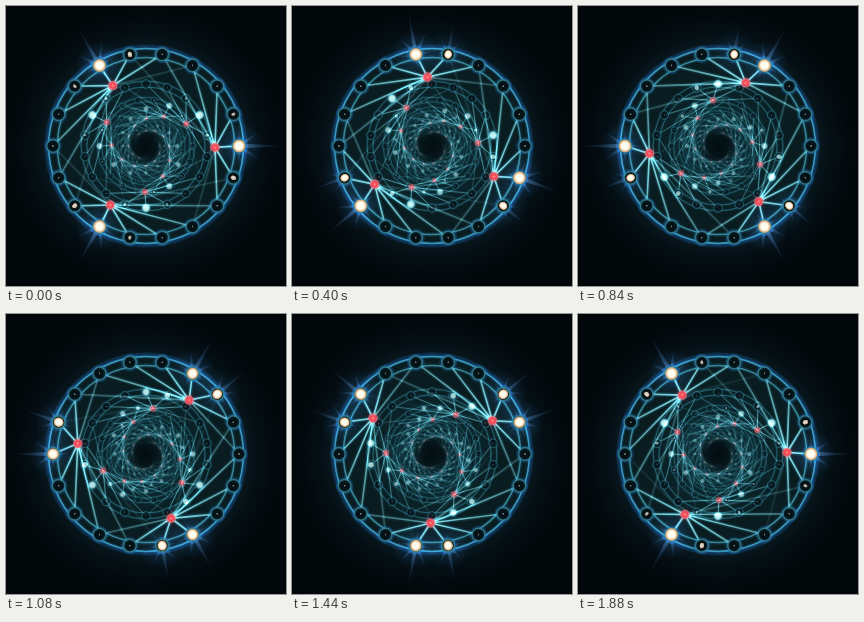
These frames come from a looping animation (280x280 px, 1.92 s). An HTML page with a canvas:

```html
<!DOCTYPE html>
<html lang="en">
<head>
<meta charset="utf-8">
<title>Light tunnel</title>
<style>
html, body { margin: 0; width: 100%; height: 100%; overflow: hidden; background: #02070a; }
canvas { display: block; }
</style>
</head>
<body>
<canvas id="stage" width="280" height="280"></canvas>
<script>
const ctx = document.getElementById('stage').getContext('2d');
const LOOP = 1920, STEP = 40, BEADS = 18, LEVELS = 9, RAD = Math.PI / 180;

const polar = (r, deg) => [r * Math.cos(deg * RAD), r * Math.sin(deg * RAD)];
const wrap = (d, span) => d - span * Math.round(d / span);
const clamp = x => Math.max(0, Math.min(1, x));
const blend = mode => ctx.globalCompositeOperation = mode;

function disc(x, y, r, fill) {
  ctx.beginPath();
  ctx.arc(x, y, r, 0, 2 * Math.PI);
  ctx.fillStyle = fill;
  ctx.fill();
}

function circle(x, y, r, width, color) {
  ctx.beginPath();
  ctx.arc(x, y, r, 0, 2 * Math.PI);
  ctx.lineWidth = width;
  ctx.strokeStyle = color;
  ctx.stroke();
}

function line(a, b, width, color) {
  ctx.beginPath();
  ctx.moveTo(...a);
  ctx.lineTo(...b);
  ctx.lineWidth = width;
  ctx.strokeStyle = color;
  ctx.stroke();
}

function radial(x, y, r, ...stops) {
  const g = ctx.createRadialGradient(x, y, 0, x, y, r);
  stops.forEach(([at, color]) => g.addColorStop(at, color));
  return g;
}

const glow = (x, y, r, rgb, a) =>
  disc(x, y, r, radial(x, y, r, [0, `rgba(${rgb},${a})`], [.4, `rgba(${rgb},${a * .35})`], [1, `rgba(${rgb},0)`]));

function softCircle(x, y, r, core, a) {
  circle(x, y, r, core * 2.8, `rgba(12,58,78,${.35 * a})`);
  circle(x, y, r, core, `rgba(62,132,142,${.8 * a})`);
}

// A rod that is brightest at its hub and dims along its length
function rod(hub, end, width, a, reach) {
  const shade = (rgb, k) => radial(...hub, reach, [0, `rgba(${rgb},${k})`], [.35, `rgba(${rgb},${k * .7})`], [1, `rgba(${rgb},${k * .4})`]);
  line(hub, end, width * 2.6, shade('20,80,95', .35 * a));
  line(hub, end, width, shade('135,195,195', .85 * a));
}

function flare(x, y, deg, power) {
  glow(x, y, 24, '45,105,190', .5 * power);
  [[0, 46], [180, 18], [35, 26], [-35, 26], [90, 18], [-90, 18]].forEach(([turn, len]) => {
    const [dx, dy] = polar(len * power, deg + turn), [nx, ny] = polar(2.4, deg + turn + 90);
    ctx.beginPath();
    ctx.moveTo(x + nx, y + ny);
    ctx.lineTo(x + dx, y + dy);
    ctx.lineTo(x - nx, y - ny);
    ctx.fillStyle = radial(x, y, len, [0, `rgba(120,170,225,${.4 * power})`], [1, 'rgba(40,90,160,0)']);
    ctx.fill();
  });
}

function bead(x, y, deg, s, lit, near, alpha) {
  blend('lighter');
  if (near) circle(x, y, 7.6, 2.5, 'rgba(15,70,140,.4)');
  if (near && lit > .4) flare(x, y, deg, lit);
  else if (lit > .4) glow(x, y, 11 * s, '50,150,180', .6 * lit * alpha);
  blend('source-over');
  disc(x, y, 6 * s, `rgba(4,18,23,${alpha})`);
  softCircle(x, y, 6.4 * s, near ? 1.5 : 1, alpha);
  ctx.save();
  ctx.translate(x, y);
  ctx.rotate(deg * RAD);
  ctx.scale(1, .7 + .3 * lit);
  const r = s * (1.3 + 5.4 * lit);
  const core = near ? '255,252,240' : '205,250,250', rim = near ? '255,190,130' : '100,195,205';
  const heat = near ? .45 + .55 * clamp(lit * 2) : clamp(alpha * (.4 + lit));
  disc(0, 0, r, radial(0, 0, r, [0, `rgba(${core},${heat})`], [.55, `rgba(${core},${heat})`], [.85, `rgba(${rim},${heat * .85})`], [1, `rgba(${rim},0)`]));
  ctx.restore();
}

function level(k, turn) {
  const s = 1 / (1 + k / 2), R = 93 * s, near = k === 0;
  const alpha = near ? 1 : .68 * .76 ** (k - 1);
  const head = turn - 30 * k;
  const hubs = [0, 120, 240].map(d => polar(69 * s, head + d));
  const spots = Array.from({ length: BEADS }, (_, i) => {
    const deg = i * 20 - 30 * k, gap = wrap(deg - head, 120);
    return { deg, p: polar(R, deg), lit: clamp((25 - Math.abs(gap)) / 18) };
  });

  blend('lighter');
  if (near) circle(0, 0, R + 6, 5, 'rgba(12,58,125,.35)');
  for (const edge of [-4.4, 4.4]) softCircle(0, 0, R + edge * s, near ? 1.5 : .9, alpha * .85);

  // Each hub fans out to the beads around it, farther on the trailing side
  for (const { deg, p } of spots) hubs.forEach((hub, j) => {
    const ahead = wrap(deg - head - 120 * j, 360);
    const fade = clamp((65 - ahead) / 25) * clamp((ahead + 115) / 45);
    if (fade) rod(hub, p, near ? 1.7 : .9, fade * alpha, 150 * s);
  });

  for (const { deg, p, lit } of spots) bead(...p, deg, s, lit, near, alpha);

  for (const [x, y] of hubs) {
    const r = Math.max(4.8 * s, 1.5);
    blend('lighter');
    glow(x, y, r * 2, '220,40,60', .4 * alpha);
    blend('source-over');
    disc(x, y, r, radial(x, y, r, [0, `rgba(255,135,140,${alpha})`], [.5, `rgba(245,65,80,${alpha})`], [1, `rgba(230,120,130,${alpha * .7})`]));
  }
}

function draw() {
  const t = Math.floor(performance.now() % LOOP / STEP) * STEP;
  ctx.setTransform(1, 0, 0, 1, 0, 0);
  blend('source-over');
  ctx.fillStyle = '#02070a';
  ctx.fillRect(0, 0, 280, 280);
  ctx.translate(140, 140);
  disc(0, 0, 140, radial(0, 0, 140, [0, '#030d11'], [.1, '#05161b'], [.25, '#0b282e'], [.5, '#091c20'], [.68, '#0a1c20'], [.8, '#040f15'], [1, '#02070a']));
  for (let k = LEVELS - 1; k >= 0; k--) level(k, 1.2 + 120 * t / LOOP);
  requestAnimationFrame(draw);
}
draw();
</script>
</body>
</html>
```
